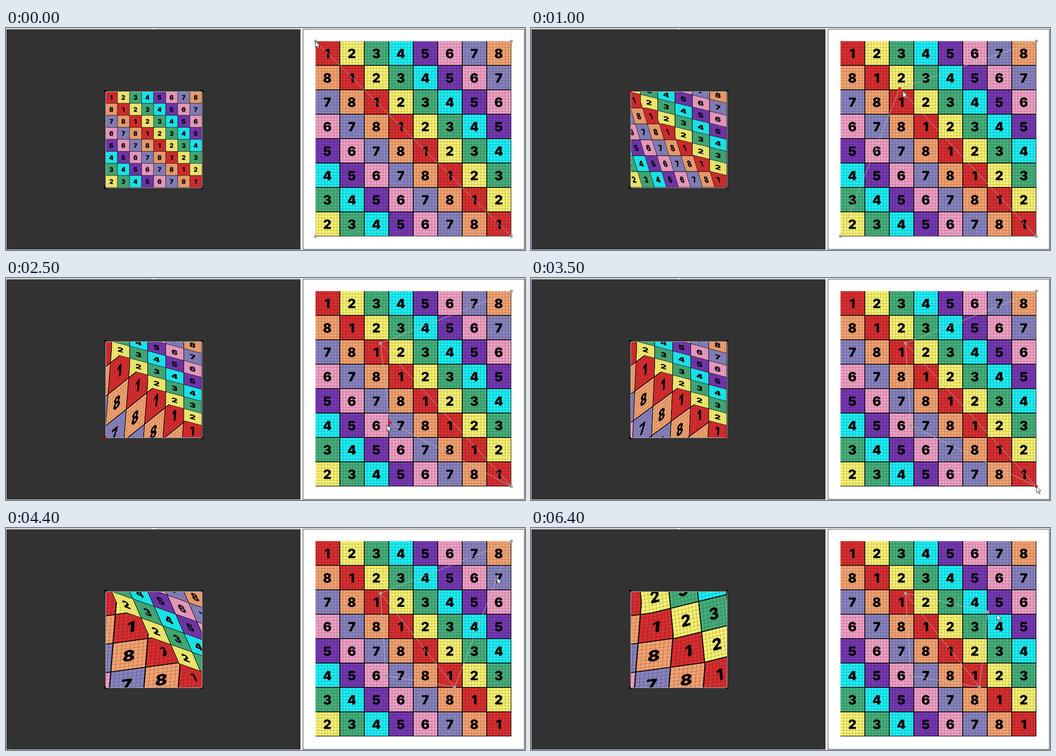
An HTML page with a canvas for the animation above (6.5 s loop, 1142 px wide and 490 px high).

```html
<!DOCTYPE html>
<html lang="en">
<head>
<meta charset="utf-8">
<title>Texture coordinates</title>
<style>
  html, body { margin: 0; width: 100%; height: 100%; overflow: hidden; background: #fff; }
  canvas { display: block; }
</style>
</head>
<body>
<canvas id="stage" width="1142" height="490"></canvas>
<script>
const ctx = document.getElementById('stage').getContext('2d');
const LOOP = 6500, STEP = 100, LAG = 100;
const MAP = { x: 681, y: 29, size: 431 };
const QUAD = { x: 219, y: 140, size: 212 };
const CELLS = 8, SUBCELLS = 8, SCALE = 2;
const COLORS = ['#d92e30', '#faf372', '#45b07b', '#1cf0f6', '#7638b2', '#f2a0c6', '#8984c0', '#f5a371'];
const GREY = '#a2a2a2', RED = '#f00f0f';

const point = (x, y) => ({ x, y });
const corner = (box, u, v) => point(box.x + u * box.size, box.y + v * box.size);
const mix = (a, b, p) => point(a.x + (b.x - a.x) * p, a.y + (b.y - a.y) * p);

// The pointer leaves for a corner, arrives, then drags it along a curve bent towards "via".
const DRAGS = [
  { u: 0, v: 0, leave: 0, arrive: 300, grab: 300, drop: 1300, to: point(824, 144) },
  { u: 0, v: 1, leave: 1200, arrive: 1700, grab: 1800, drop: 2700, to: point(836, 326), via: point(932, 248) },
  { u: 1, v: 1, leave: 2900, arrive: 3500, grab: 3600, drop: 4400, to: point(987, 351) },
  { u: 1, v: 0, leave: 4300, arrive: 4500, grab: 5000, drop: 5900, to: point(1005, 185), via: point(896, 231) }
];
const DRIFT = { leave: 5900, arrive: 6200, to: point(1025, 190) };

function easeOut(t, start, end) {
  const p = Math.min(1, Math.max(0, (t - start) / (end - start)));
  return p * (2 - p);
}

function dragged(d, t) {
  const from = corner(MAP, d.u, d.v), via = d.via || mix(from, d.to, 0.5);
  const s = easeOut(t, d.grab, d.drop);
  return mix(mix(from, via, s), mix(via, d.to, s), s);
}

function cursorAt(t) {
  let pos = corner(MAP, 0, 0);
  for (const d of DRAGS) {
    if (t < d.leave) return pos;
    pos = t < d.grab
      ? mix(pos, corner(MAP, d.u, d.v), easeOut(t, d.leave, d.arrive))
      : dragged(d, t + LAG);
  }
  return mix(pos, DRIFT.to, easeOut(t, DRIFT.leave, DRIFT.arrive));
}

function isHot(i, t) {
  return t >= DRAGS[i].arrive && t < (DRAGS[i + 1] || DRIFT).leave;
}

function makeTexture() {
  const canvas = document.createElement('canvas');
  canvas.width = canvas.height = MAP.size * SCALE;
  const g = canvas.getContext('2d');
  const cell = MAP.size / CELLS;
  const rule = (pos, width) => {
    g.fillRect(pos, 0, width, MAP.size);
    g.fillRect(0, pos, MAP.size, width);
  };
  g.scale(SCALE, SCALE);
  g.font = '900 28px Inter, "Liberation Sans", sans-serif';
  g.textAlign = 'center';
  for (let row = 0; row < CELLS; row++) {
    for (let col = 0; col < CELLS; col++) {
      const n = (col - row + CELLS) % CELLS;
      g.fillStyle = COLORS[n];
      g.fillRect(col * cell, row * cell, cell, cell);
      g.fillStyle = '#000';
      g.fillText(n + 1, (col + 0.5) * cell - 1, (row + 0.5) * cell + 10.5);
    }
  }
  g.fillStyle = 'rgba(0,0,0,0.27)';
  for (let i = 1; i < CELLS * SUBCELLS; i++) rule(i * cell / SUBCELLS - 0.4, 0.8);
  g.fillStyle = '#080808';
  for (let i = 1; i <= CELLS; i++) rule(i * cell - 1.3, 1.9);
  return canvas;
}
const texture = makeTexture();

function polygon(points) {
  ctx.beginPath();
  points.forEach(p => ctx.lineTo(p.x, p.y));
  ctx.closePath();
}

function square(p, size, color) {
  ctx.fillStyle = color;
  ctx.fillRect(Math.round(p.x - size / 2), Math.round(p.y - size / 2), size, size);
}

// Maps the texture triangle "src" onto the screen triangle "dst".
function drawTriangle(src, dst, clip) {
  const [s, s1, s2] = src, [d, d1, d2] = dst;
  const ax = s1.x - s.x, ay = s1.y - s.y, bx = s2.x - s.x, by = s2.y - s.y;
  const det = ax * by - bx * ay;
  const solve = k => {
    const f = d1[k] - d[k], g = d2[k] - d[k];
    return [(f * by - g * ay) / det, (g * ax - f * bx) / det];
  };
  const [xx, xy] = solve('x'), [yx, yy] = solve('y');
  const u = s.x - MAP.x, v = s.y - MAP.y;
  ctx.save();
  polygon(clip);
  ctx.clip();
  ctx.transform(xx, yx, xy, yy, d.x - xx * u - xy * v, d.y - yx * u - yy * v);
  ctx.drawImage(texture, 0, 0, MAP.size, MAP.size);
  ctx.restore();
}

function drawPanels() {
  ctx.fillStyle = '#fff';
  ctx.fillRect(0, 0, 1142, 490);
  ctx.fillStyle = '#858585';
  ctx.fillRect(1, 1, 321, 1);
  ctx.fillRect(328, 1, 321, 1);
  ctx.fillStyle = '#323232';
  ctx.fillRect(1, 3, 647, 486);
  ctx.strokeStyle = '#222';
  ctx.lineWidth = 1;
  ctx.strokeRect(653.5, 2.5, 487, 486);
}

function drawQuad(uv, hot) {
  const q = DRAGS.map(d => corner(QUAD, d.u, d.v));
  const [tl, bl, br, tr] = q;
  q.forEach(p => square(p, 6, '#000'));
  // The lower half reaches slightly past the diagonal to hide the seam.
  const lower = [tl, bl, br, point(br.x, br.y - 1), point(tl.x + 1, tl.y)];
  drawTriangle([uv[0], uv[1], uv[2]], [tl, bl, br], lower);
  drawTriangle([uv[0], uv[2], uv[3]], [tl, br, tr], [tl, br, tr]);
  ctx.strokeStyle = '#b8b8b8';
  ctx.strokeRect(QUAD.x + 0.5, QUAD.y + 0.5, QUAD.size, QUAD.size);
  q.forEach((p, i) => { if (hot[i]) square(p, 5, RED); });
}

function drawMap(uv, hot) {
  ctx.drawImage(texture, MAP.x, MAP.y, MAP.size, MAP.size);
  ctx.strokeStyle = '#bcbcbc';
  polygon(uv);
  ctx.moveTo(uv[0].x, uv[0].y);
  ctx.lineTo(uv[2].x, uv[2].y);
  ctx.stroke();
  uv.forEach((p, i) => square(p, 6, hot[i] ? RED : GREY));
}

function drawCursor({ x, y }) {
  const shape = [[0, 0], [0, 14], [3.2, 11], [5.5, 16.2], [8, 15.2], [5.7, 10.2], [10, 10]];
  polygon(shape.map(([dx, dy]) => point(x + dx, y + dy)));
  ctx.fillStyle = '#fff';
  ctx.fill();
  ctx.strokeStyle = '#222';
  ctx.stroke();
}

function render(now) {
  const t = Math.floor((now % LOOP) / STEP) * STEP;
  const uv = DRAGS.map(d => dragged(d, t));
  const hot = DRAGS.map((d, i) => isHot(i, t));
  ctx.imageSmoothingQuality = 'high';
  drawPanels();
  drawQuad(uv, hot);
  drawMap(uv, hot);
  drawCursor(cursorAt(t));
}

const start = performance.now();
function tick() {
  render(performance.now() - start);
  requestAnimationFrame(tick);
}
tick();
</script>
</body>
</html>
```
